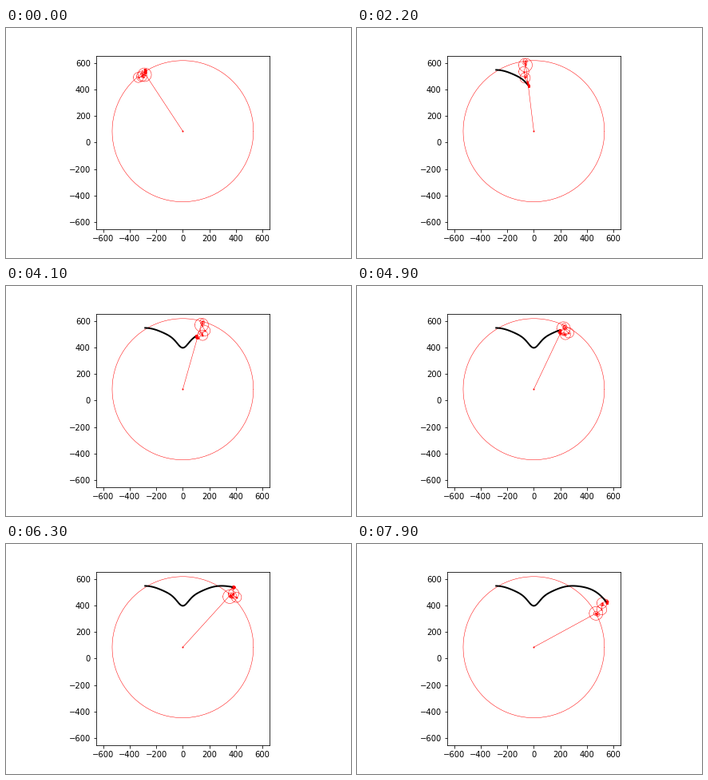
These frames come from a looping animation (432x288 px, 8 s). A matplotlib script:

```python
import numpy as np
import matplotlib.pyplot as plt
from matplotlib.animation import FuncAnimation

FRAMES = 80
INTERVAL = 100
STEP = np.radians(1.2)      # turn of the slowest arm per frame
DIP = 27.8                  # time, in frames, at which every arm is vertical
LIMIT = 654
CENTER = 84.7j

# Signed arm lengths (clockwise, counter-clockwise) for orders 1, 2, 3, ...
PAIRS = [(532, -16), (-15, -51), (-38, -12), (-39, -0.6),
         (-10, -3.6), (-5.4, -3), (-5.4, -1.2)]
PAIRS += [(-120 / k**2, -120 / k**2) for k in range(8, 21)]

lengths = np.array(PAIRS, float).ravel()
orders = np.array([(k, -k) for k in range(1, len(PAIRS) + 1)]).ravel()
rim = np.exp(1j * np.linspace(0, 2 * np.pi, 181))


def joints(n):
    """Positions of all joints of the arm chain at time n."""
    arms = 1j * lengths * np.exp(-1j * orders * STEP * (n - DIP))
    return CENTER + np.concatenate(([0], np.cumsum(arms)))


path = np.array([joints(n)[-1] for n in range(FRAMES)])

fig, ax = plt.subplots(figsize=(6, 4), dpi=72)
fig.subplots_adjust(left=0.125, right=0.9, bottom=0.125, top=0.88)
ax.set_aspect("equal")
ax.set_xlim(-LIMIT, LIMIT)
ax.set_ylim(-LIMIT, LIMIT)
ticks = range(-600, 601, 200)
ax.set_xticks(ticks)
ax.set_yticks(ticks)

circles = [ax.plot([], [], "r-", lw=0.5, zorder=2)[0] for _ in lengths]
trace, = ax.plot([], [], "k-", lw=2, zorder=3)
chain, = ax.plot([], [], "ro-", lw=0.5, ms=1, zorder=4)


def update(n):
    pts = joints(n)
    for circle, c, r in zip(circles, pts, lengths):
        edge = c + r * rim
        circle.set_data(edge.real, edge.imag)
    chain.set_data(pts.real, pts.imag)
    trace.set_data(path[:n + 1].real, path[:n + 1].imag)
    return [*circles, trace, chain]


anim = FuncAnimation(fig, update, frames=FRAMES, interval=INTERVAL,
                     repeat=True, repeat_delay=0, blit=False)
plt.show()
```
